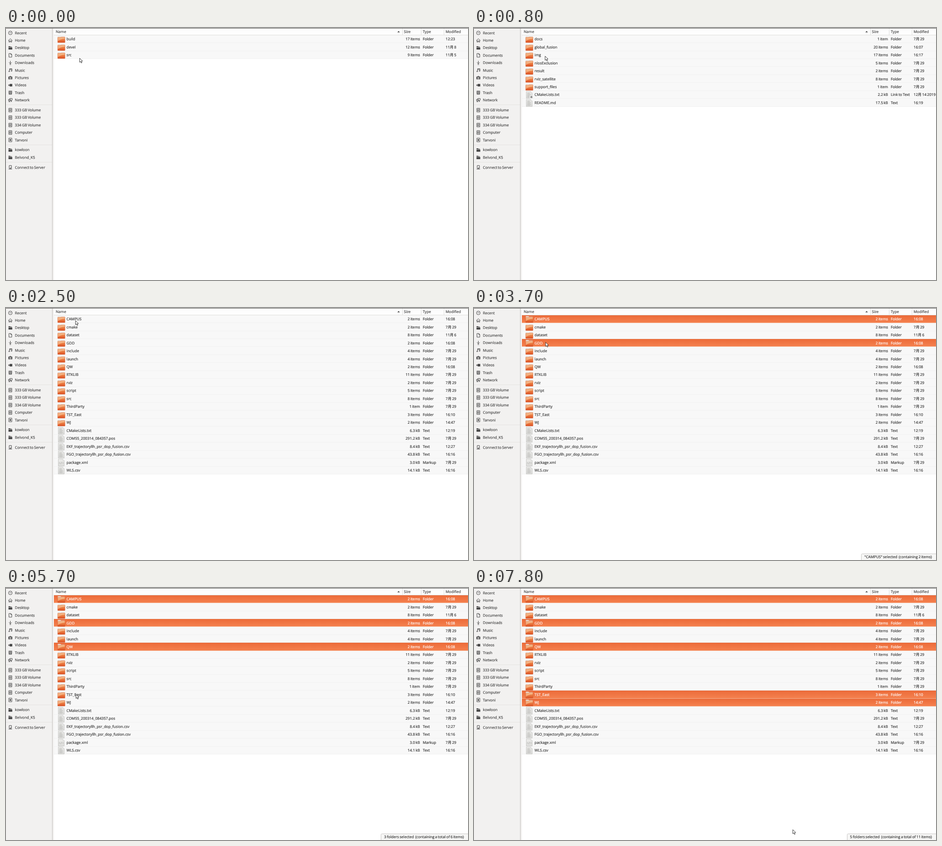
An HTML page with a canvas that plays this animation: 1012x553 px, repeating every 8 s.

```html
<!DOCTYPE html>
<html lang="en">
<head>
<meta charset="utf-8">
<title>File browser</title>
<style>
html, body { margin: 0; width: 100%; height: 100%; overflow: hidden; background: #fff; }
canvas { display: block; }
</style>
</head>
<body>
<canvas id="stage" width="1012" height="553"></canvas>
<script>
const ctx = document.getElementById('stage').getContext('2d');
const LOOP = 8000, ROW = 17.47, TOP = 15.6;
const INK = '#363636', SIDE_INK = '#444';
const FONT = '8.1px "Open Sans", "Noto Sans", "Noto Sans CJK SC", "Noto Sans CJK JP", sans-serif';

// name | size | type | modified
const parse = text => text.trim().split('\n').map(line => line.trim().split('|'));
const workspace = parse(`
  build|17 items|Folder|12:23
  devel|12 items|Folder|11月 8
  src|9 items|Folder|11月 5`);
const sources = parse(`
  docs|1 item|Folder|7月 29
  global_fusion|20 items|Folder|16:07
  img|17 items|Folder|16:17
  nlosExclusion|5 items|Folder|7月 29
  result|2 items|Folder|7月 29
  rviz_satellite|8 items|Folder|7月 29
  support_files|1 item|Folder|7月 29
  CMakeLists.txt|2.2 kB|Link to Text|12月 14 2019
  README.md|17.5 kB|Text|16:19`);
const fusion = parse(`
  CAMPUS|2 items|Folder|16:08
  cmake|2 items|Folder|7月 29
  dataset|8 items|Folder|11月 6
  GDD|2 items|Folder|16:08
  include|4 items|Folder|7月 29
  launch|4 items|Folder|7月 29
  QW|2 items|Folder|16:08
  RTKLIB|11 items|Folder|7月 29
  rviz|2 items|Folder|7月 29
  script|5 items|Folder|7月 29
  src|8 items|Folder|7月 29
  ThirdParty|1 item|Folder|7月 29
  TST_East|3 items|Folder|16:10
  WJ|2 items|Folder|14:47
  CMakeLists.txt|6.3 kB|Text|12:19
  COM55_200314_084357.pos|291.2 kB|Text|7月 29
  EKF_trajectoryllh_psr_dop_fusion.csv|8.4 kB|Text|12:27
  FGO_trajectoryllh_psr_dop_fusion.csv|43.8 kB|Text|16:16
  package.xml|3.0 kB|Markup|7月 29
  WLS.csv|14.1 kB|Text|16:16`);

// Each timeline entry holds until the next one starts.
const listings = [[0, workspace], [700, []], [800, sources], [1700, []], [1900, fusion]];
const selections = [
  [0, []], [600, [2]], [700, []], [1400, [1]], [1700, []], [3200, [0]], [3700, [0, 3]],
  [4500, [0, 3, 6]], [5900, [0, 3, 6, 12]], [6600, [0, 3, 6, 12, 13]]
];
const folders = (n, items) => `${n} folders selected  (containing a total of ${items} items)`;
const statuses = [
  [0, ''], [3200, '"CAMPUS" selected  (containing 2 items)'], [3900, folders(2, 4)],
  [5000, folders(3, 6)], [6300, folders(4, 9)], [6800, folders(5, 11)]
];
const glide = (start, end, from, to) => {
  const steps = (end - start) / 100 + 1;
  return Array.from({ length: steps }, (_, i) => {
    const k = (i + 1) / steps;
    return [start + i * 100, from.map((v, axis) => v + (to[axis] - v) * k)];
  });
};
const pointer = [
  [0, [161, 66]], [200, [155.5, 61.5]],
  ...glide(1000, 1500, [155.5, 61.5], [154, 40]),
  ...glide(1900, 2500, [154, 40], [152, 27.5]),
  [3200, [156.5, 71]], [3400, [156.5, 75]], [3900, [155, 109]], [4200, [153.5, 132]],
  [5000, [150.5, 179]], [5200, [151.5, 199]], [5500, [151.5, 223]], [5700, [153, 233]],
  [5900, [152, 238]], [6300, [151.5, 253.5]], [6800, [370.5, 309.5]], [7100, [728.5, 520]],
  [7300, [733, 542]], [7800, [698, 530]]
];
const at = (timeline, t) => timeline.findLast(entry => entry[0] <= t)[1];

function rect(x, y, w, h, fill) {
  ctx.fillStyle = fill;
  ctx.fillRect(x, y, w, h);
}
// A hairline outline gives the text its slightly heavy weight.
function label(text, x, middle, color = INK, align = 'left') {
  ctx.fillStyle = ctx.strokeStyle = color;
  ctx.lineWidth = .2;
  ctx.textAlign = align;
  ctx.fillText(text, x, middle + 2.8);
  ctx.strokeText(text, x, middle + 2.8);
}
function shape(path, x, y, fill, stroke, width = 1) {
  ctx.save();
  ctx.translate(x, y);
  if (fill) { ctx.fillStyle = fill; ctx.fill(path, 'evenodd'); }
  if (stroke) { ctx.strokeStyle = stroke; ctx.lineWidth = width; ctx.stroke(path); }
  ctx.restore();
}
function gradient(y, height, ...colors) {
  const g = ctx.createLinearGradient(0, y, 0, y + height);
  colors.forEach((c, i) => g.addColorStop(i / (colors.length - 1), c));
  return g;
}

// Sidebar glyphs are centred on 0,0; solid ones are filled instead of stroked.
const line = d => ({ path: new Path2D(d) });
const solid = d => ({ path: new Path2D(d), solid: true });
const glyphs = {
  clock: line('M-4 0a4 4 0 1 0 8 0a4 4 0 1 0-8 0M-1.8-1.2L0 .4L2-1.4'),
  home: line('M-4.3.3L0-3.7L4.3.3M-3-.5V3.7H-1V1H1V3.7H3V-.5'),
  folder: solid('M-4-3.5H-.5L.5-2.5H3.5V-1.5H-4ZM-4-.8H4.2V3.8H-4Z'),
  page: line('M-3-4H1L3.2-1.8V4H-3ZM1-4V-1.7H3.2'),
  download: line('M0-4.2V2M-3-.8L0 2.2L3-.8M-1.7 3.9H1.7'),
  music: line('M-1.7 2.4V-3.3H3.5V1.4M-3.6 2.5a1 .9 0 1 0 2 0a1 .9 0 1 0-2 0M1.6 1.5a1 .9 0 1 0 2 0a1 .9 0 1 0-2 0M-1.7-1.7H3.5'),
  camera: solid('M-4.2-2.4H-2L-1.2-3.6H1.2L2-2.4H4.2V3.5H-4.2ZM-2.2.5a2.2 2.2 0 1 0 4.4 0a2.2 2.2 0 1 0-4.4 0M-1.1.5a1.1 1.1 0 1 0 2.2 0a1.1 1.1 0 1 0-2.2 0'),
  video: solid('M-1.5-2.8H4.2V2.8H-1.5ZM-4-2L-1.8-.7V.7L-4 2Z'),
  trash: line('M-3.8-3.5H3.8M-3.4-2L-2.8 3.8H2.8L3.4-2ZM-1.2-1V3M1.2-1V3M-3 .8H3'),
  network: line('M-1-3.7H4V.2H-1ZM-4-1.8H-.3V1.6H-4ZM-2.2 1.6V3.5M-3.7 3.6H-.7M2 .2V2.8M.5 3H3.6'),
  disk: line('M-3.3-4H3.3V4H-3.3ZM-1.8-.5a1.8 1.8 0 1 0 3.6 0a1.8 1.8 0 1 0-3.6 0M0-.5L-1.6 2.5M1 2.6H2'),
  system: line('M-3.3-4H3.3V4H-3.3ZM-1-1.5H1V1.5H-1ZM-1 0H1M0-1.5V1.5'),
  server: line('M-2.5-4H2.5V2H-2.5ZM0 2V3.8M-3.8 3.8H3.8M.5.3H1.5')
};
const sidebar = [
  [10.8, 'clock|Recent', 'home|Home', 'folder|Desktop', 'page|Documents', 'download|Downloads',
    'music|Music', 'camera|Pictures', 'video|Videos', 'trash|Trash', 'network|Network'],
  [180.2, 'disk|333 GB Volume', 'disk|333 GB Volume', 'disk|334 GB Volume', 'disk|Computer', 'system|Tarvoni'],
  [267.6, 'folder|kowloon', 'folder|Belvond_K5'],
  [305.8, 'server|Connect to Server']
];

function drawSidebar() {
  rect(0, 0, 105, 553, '#f2f1f0');
  rect(101, 1, 1, 552, '#c2bfbc');
  sidebar.forEach(([y, ...items], group) => {
    if (group) rect(0, Math.round(y - 12), 101, 1, '#e5e3e1');
    items.forEach((item, i) => {
      const [icon, text] = item.split('|'), middle = y + i * 16.38, glyph = glyphs[icon];
      shape(glyph.path, 9.5, middle, glyph.solid && SIDE_INK, !glyph.solid && SIDE_INK);
      label(text, 19.6, middle, SIDE_INK);
    });
  });
}

const folderBack = new Path2D('M.6 2.2Q.6 1.6 1.2 1.6H6.4L7.2 2.6H15.4V6H.6Z');
const folderFront = new Path2D('M.2 4.6Q.2 4 .8 4H7L8 3.2H15.6Q16.2 3.2 16.2 3.8V14.8Q16.2 15.4 15.6 15.4H.8Q.2 15.4 .2 14.8Z');
const folderShine = new Path2D('M.6 4.6H7.3L8.3 3.8H15.7V7Q6.5 7.6 .6 12.5Z');
const paper = new Path2D('M.5.5H10L13.5 4V15.8H.5Z');
const paperFold = new Path2D('M10 .5V4H13.5Z');
const markup = new Path2D('M4.5 7L2.5 9L4.5 11M9.5 7L11.5 9L9.5 11M8 6.5L6 11.5');
const arrow = new Path2D('M.3.3V9.2L2.4 7.4L3.9 10.7L5.5 10L4 6.8L6.7 6.5Z');

function drawIcon(type, y) {
  if (type === 'Folder') {
    shape(folderBack, 113, y, '#f0ebe6', '#d9d2cb', .5);
    shape(folderFront, 113, y, gradient(3, 13, '#f0a067', '#ea7a40', '#d9481d'), '#cb5c34', .5);
    shape(folderShine, 113, y, 'rgba(255,232,195,.42)');
    return;
  }
  shape(paper, 114, y, gradient(0, 16, '#eeeeec', '#dcdcda'), '#b9b9b6', .7);
  shape(paperFold, 114, y, '#fafafa', '#bdbdba', .5);
  if (type === 'Markup') return shape(markup, 114, y, null, '#a0a09d', .8);
  for (let i = 0; i < 6; i++) rect(116.5, y + 3.2 + i * 1.9, i < 2 ? 6 : 8.5 - i % 2 * 1.5, .8, '#b2b2af');
  if (type === 'Link to Text') {
    rect(122, y + 8.8, 7.5, 7.2, '#ececea');
    rect(123.7, y + 11, 4, 3.6, '#888');
    rect(124.7, y + 10, 2, 1.5, '#999');
  }
}

function drawHeader() {
  rect(105, 1, 907, 14, '#fdfdfd');
  rect(105, 15, 907, 1, '#dededc');
  [868, 909, 959].forEach(x => rect(x, 1, 1, 14, '#dededc'));
  [['Name', 109], ['Size', 871.5], ['Type', 913], ['Modified', 963]]
    .forEach(([text, x]) => label(text, x, 8, SIDE_INK));
  shape(new Path2D('M0 3L2.8 0L5.6 3Z'), 857.2, 6.4, SIDE_INK);
}

function drawRow([name, size, type, modified], i, selected) {
  const y = TOP + i * ROW, top = Math.round(y), height = Math.round(y + ROW) - top;
  const middle = y + 8.8, color = selected ? '#fff' : INK;
  if (selected) {
    rect(105, top, 907, height, gradient(top, height, '#ec6b39', '#f58250'));
    rect(105, top, 907, 1, '#e76a3b');
    rect(105, top + height - 1, 907, 1, '#f6b190');
  } else {
    rect(105, top, 907, height, '#f8f8f8');
    rect(105, top + height - 1, 907, 1, '#f1f1f1');
  }
  ctx.save();
  ctx.translate(0, y + 1);
  drawIcon(type, 0);
  ctx.restore();
  label(name, 132.6, middle, color);
  label(size, 906.8, middle, color, 'right');
  label(type, 913, middle, color);
  label(modified, 963, middle, color);
}

function drawStatus(text) {
  const left = Math.round(1003 - ctx.measureText(text).width - 7) + .5;
  const box = new Path2D();
  box.roundRect(left, 539.5, 1020 - left, 20, [2, 0, 0, 0]);
  shape(box, 0, 0, '#f7f7f6', '#c8c6c4');
  label(text, 1003, 546.4, INK, 'right');
}

function draw(t) {
  ctx.font = FONT;
  ctx.textRendering = 'geometricPrecision';
  ctx.wordSpacing = '-0.6px';
  rect(0, 0, 1012, 553, '#fff');
  drawSidebar();
  drawHeader();
  const selection = at(selections, t), status = at(statuses, t);
  at(listings, t).forEach((row, i) => drawRow(row, i, selection.includes(i)));
  if (status) drawStatus(status);
  rect(0, 0, 1012, 1, '#575653');
  const [x, y] = at(pointer, t);
  shape(arrow, x, y, '#fff', '#222', .9);
}

function tick() {
  draw(performance.now() % LOOP);
  requestAnimationFrame(tick);
}
tick();
</script>
</body>
</html>
```
